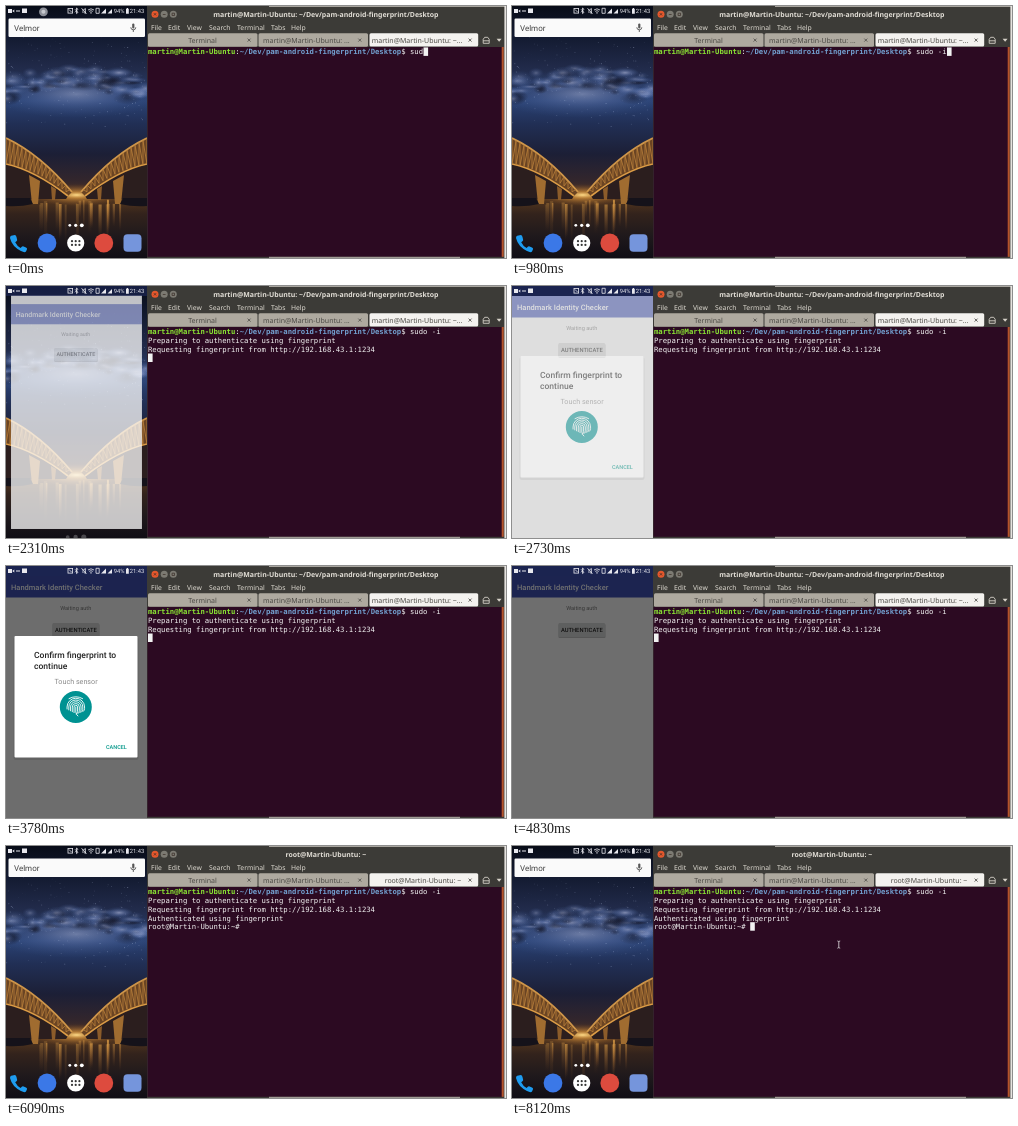
These frames come from a looping animation (500x252 px, 8.19 s). An HTML page:

```html
<!DOCTYPE html>
<html lang="en">
<head>
<meta charset="utf-8">
<title>Terminal fingerprint login</title>
<style>
  html, body { margin: 0; width: 100%; height: 100%; overflow: hidden; background: #2c0a22; }
  svg { display: block; width: 500px; height: 252px; }
  text { font-family: Roboto, sans-serif; text-rendering: geometricPrecision; white-space: pre; }
  .ui { font: 7px "Noto Sans", sans-serif; }
  .bold { font: bold 6.95px "Noto Sans", sans-serif; }
  .menu { font-size: 6.8px; }
  .mono { font: 7.264px "DejaVu Sans Mono", monospace; }
  .mid { text-anchor: middle; }
</style>
</head>
<body>
<svg viewBox="0 0 500 252">
  <defs>
    <clipPath id="phoneClip"><rect width="141" height="252"/></clipPath>
    <linearGradient id="sky" x2="0" y2="1">
      <stop offset="0" stop-color="#080c18"/>
      <stop offset=".16" stop-color="#131a30"/>
      <stop offset=".34" stop-color="#222c4c"/>
      <stop offset=".5" stop-color="#2a4274"/>
      <stop offset=".62" stop-color="#212f55"/>
      <stop offset=".78" stop-color="#1c1f36"/>
      <stop offset=".92" stop-color="#33262c"/>
      <stop offset="1" stop-color="#553620"/>
    </linearGradient>
    <linearGradient id="water" x2="0" y2="1">
      <stop offset="0" stop-color="#5c3b1f"/>
      <stop offset=".3" stop-color="#33231c"/>
      <stop offset=".65" stop-color="#1f191c"/>
      <stop offset="1" stop-color="#100e15"/>
    </linearGradient>
    <radialGradient id="haze">
      <stop offset="0" stop-color="#aab4d8" stop-opacity=".7"/>
      <stop offset=".45" stop-color="#6d82b8" stop-opacity=".4"/>
      <stop offset="1" stop-color="#41609c" stop-opacity="0"/>
    </radialGradient>
    <radialGradient id="dust">
      <stop offset="0" stop-color="#141626" stop-opacity=".8"/>
      <stop offset="1" stop-color="#141626" stop-opacity="0"/>
    </radialGradient>
    <radialGradient id="glow">
      <stop offset="0" stop-color="#ffdb88"/>
      <stop offset=".3" stop-color="#d8943c" stop-opacity=".7"/>
      <stop offset="1" stop-color="#8a5424" stop-opacity="0"/>
    </radialGradient>
    <linearGradient id="streak" x2="0" y2="1">
      <stop offset="0" stop-color="#f0ac4c" stop-opacity=".8"/>
      <stop offset="1" stop-color="#a8642a" stop-opacity="0"/>
    </linearGradient>
  </defs>

  <g clip-path="url(#phoneClip)">
    <rect width="141" height="190" fill="url(#sky)"/>
    <ellipse cx="70" cy="88" rx="90" ry="24" fill="url(#haze)" opacity=".75"/>
    <g id="clouds"></g>
    <g id="stars" fill="#c4d2f2"></g>
    <rect y="189" width="141" height="63" fill="url(#water)"/>
    <ellipse cx="70.5" cy="189" rx="46" ry="11" fill="url(#glow)"/>
    <g id="streaks" fill="url(#streak)"></g>
    <g id="bridge" fill="none">
      <path d="M0 158Q28 164 62 190L60 193H0Z" fill="#2b1e1e"/>
      <path d="M0 132Q34 148 66 186L62 190Q30 164 0 158Z" fill="#6a4423"/>
      <path d="M0 132Q34 148 66 186" stroke="#cf964a" stroke-width="1.8"/>
      <path d="M0 158Q28 164 62 190" stroke="#dc9c46" stroke-width="1.6"/>
      <g id="struts" stroke="#bb823c" stroke-width=".8"></g>
      <path d="M23 169L26 198H32L34 175Z" fill="#a06c30"/>
      <path d="M45 180L46 194H49L50 183Z" fill="#8c5c2a"/>
      <path d="M0 192H24L27 198Q14 201 0 200Z" fill="#15121a"/>
    </g>
    <use href="#bridge" transform="matrix(-1 0 0 1 141 0)"/>

    <g id="launcher">
      <rect x="2.5" y="12.5" width="136.5" height="18.5" rx="1.2" fill="#fafafa"/>
      <text x="8" y="24.8" font-size="8" fill="#424242">Velmor</text>
      <g fill="none" stroke="#555" stroke-width=".9">
        <rect x="126.2" y="17.5" width="2.2" height="5" rx="1.1" fill="#555" stroke="none"/>
        <path d="M124.8 21.3a2.5 2.5 0 0 0 5 0M127.3 23.8V26"/>
      </g>
      <g fill="#fff">
        <circle cx="63.8" cy="219.3" r="1.4"/><circle cx="69.7" cy="219.3" r="1.6"/><circle cx="75.8" cy="219.3" r="1.9"/>
        <circle cx="69.7" cy="237" r="8.6"/>
      </g>
      <path d="M5.2 229.8L8.8 229Q10 229 10.5 231L11.2 234Q11.3 235 9.2 236.2Q11 240 14.6 242Q16 240 17 240.2L20 241.4Q21.4 242 21 243.3L20 245.5Q18.8 247 15 245Q6 240.5 4 232Q4 230.4 5.2 229.8Z" fill="#1e9cf0"/>
      <circle cx="41" cy="237" r="9.4" fill="#3b78e7"/>
      <g id="grid" fill="#333"></g>
      <circle cx="97.8" cy="237" r="9.4" fill="#dd4b3e"/>
      <rect x="117.5" y="228.3" width="18" height="17.5" rx="4" fill="#7595dc"/>
    </g>

    <g id="app">
      <rect width="141" height="252" fill="#fafafa"/>
      <rect y="10" width="141" height="21.5" fill="#3f51b5"/>
      <text x="5" y="23.7" font-size="7.5" font-weight="500" fill="#fff">Handmark Identity Checker</text>
      <text class="mid" x="69.7" y="43.8" font-size="5.6" fill="#757575">Waiting auth</text>
      <rect x="46.5" y="58" width="47" height="14" rx="1" fill="#000" opacity=".22"/>
      <rect x="46.5" y="57" width="46.5" height="14" rx="1" fill="#d6d7d7"/>
      <text class="mid" x="69.8" y="66.2" font-size="5.8" font-weight="500" fill="#212121">AUTHENTICATE</text>
      <rect id="veil" y="10" width="141" height="242" fill="#fff"/>
      <rect id="dim" y="10" width="141" height="242"/>
    </g>
    <g id="dialog">
      <rect x="7.5" y="71" width="125" height="123" rx="2" opacity=".1"/>
      <rect x="8.5" y="70" width="123" height="121.5" rx="1" fill="#fff"/>
      <g font-size="8.55" font-weight="500" fill="#222">
        <text x="28" y="91.7">Confirm fingerprint to</text>
        <text x="28" y="102.9">continue</text>
      </g>
      <text class="mid" x="70" y="117.5" font-size="7.2" fill="#8a8a8a">Touch sensor</text>
      <circle cx="69.8" cy="141" r="16" fill="#009292"/>
      <g id="ridges" fill="none" stroke="#fff" stroke-width=".9" stroke-linecap="round"></g>
      <text x="100" y="182.8" font-size="5.5" font-weight="500" fill="#009688">CANCEL</text>
    </g>

    <rect id="bar" width="141" height="10" fill="#1b2450"/>
    <g fill="#e8e8ee">
      <path d="M2 3h4v4H2zM6.3 5l2-1.6v3.2zM10 4.6h4v1h-4zM16 2.5h5v4.6h-5z"/>
      <g fill="none" stroke="#e8e8ee" stroke-width=".8">
        <rect x="62" y="2.5" width="4.6" height="4.6"/>
        <path d="M63 3.5l2.6 2.6M69 3.3l3 3-1.5 1.3V2l1.5 1.3-3 3M76 4h1.4l2-1.5v5l-2-1.5H76M75.5 2.2l5 5.4"/>
        <path d="M82 4Q85 1.6 88 4M83.2 5.4Q85 4 86.8 5.4M90 2.3h3.2v5H90z"/>
      </g>
      <path d="M95 7.5L100 2.5V7.5ZM101.5 7.5L106 3V7.5ZM84.4 6.3h1.2v1.2h-1.2zM120 2.8h.8V2h1.2v.8h.8v5H120z"/>
      <text x="107.8" y="7.3" font-size="5.8">94%</text>
      <text x="123.8" y="7.3" font-size="5.8">21:43</text>
    </g>
    <g id="touch">
      <circle cx="37.4" cy="5.8" r="4.4" fill="#8d9099"/>
      <circle cx="37.4" cy="5.8" r="2" fill="#c6c8ce"/>
    </g>
  </g>

  <rect x="141" width="359" height="252" fill="#3c3b37"/>
  <rect x="263" width="237" height=".9" fill="#b5b2aa"/>
  <circle cx="149" cy="8.3" r="3.5" fill="#e5572c"/>
  <circle cx="158.2" cy="8.3" r="3.5" fill="#7c7a72"/>
  <circle cx="167.3" cy="8.3" r="3.5" fill="#7c7a72"/>
  <path d="M147.8 7.1l2.4 2.4m0-2.4l-2.4 2.4M156.8 8.5h2.8M166.1 7.2h2.4v2.3h-2.4z" fill="none" stroke="#3a2d28" stroke-width=".7"/>
  <text id="title" class="bold mid" x="319.8" y="11" fill="#e3dfd7"></text>
  <g id="menu" fill="#dfdbd2"></g>
  <rect x="142" y="27.3" width="109.5" height="13.5" rx="1.5" fill="#aea99f"/>
  <rect x="252.5" y="27.3" width="109.5" height="13.5" rx="1.5" fill="#aea99f"/>
  <rect x="363.5" y="27.3" width="108.7" height="13.2" rx="1.5" fill="#f4f2ef"/>
  <g fill="#4c4a45">
    <text class="ui mid" x="196.5" y="36.8">Terminal</text>
    <text class="ui" x="257" y="36.8">martin@Martin-Ubuntu: ...</text>
    <text id="tab" class="ui mid" y="36.8"></text>
  </g>
  <path d="M241.6 32.6l3 3m0-3l-3 3M352.3 32.6l3 3m0-3l-3 3M462.6 32.6l3 3m0-3l-3 3" stroke="#55534e" stroke-width=".9"/>
  <path d="M477.2 37.3v-4l1.5-2h3l1.5 2v4zM477.2 34.8h6" fill="none" stroke="#d5d1c8" stroke-width=".9"/>
  <path d="M490.6 32.8h5l-2.5 3z" fill="#d5d1c8"/>
  <rect x="141.5" y="41" width="354.5" height="209.8" fill="#2c0a22"/>
  <rect x="495.7" y="41" width="2" height="209.8" fill="#b4532b"/>
  <rect x="498.4" width="1.6" height="252" fill="#e6e3df"/>
  <rect x="263" y="250.8" width="191" height="1.2" fill="#a09c95"/>
  <g fill="#f2f2f2">
    <text class="mono" x="142" y="48.4"><tspan font-weight="bold" fill="#8ae234">martin@Martin-Ubuntu</tspan>:<tspan font-weight="bold" fill="#729fcf">~/Dev/pam-android-fingerprint/Desktop</tspan>$ <tspan id="typed"></tspan></text>
    <g id="rows"></g>
    <rect id="caret" width="4.6" height="8.5"/>
  </g>
  <path id="pointer" d="M325.4 95q1.2 0 1.4.8q.2-.8 1.4-.8M326.8 95.8v5.6M325.4 102.2q1.2 0 1.4-.8q.2.8 1.4.8" fill="none" stroke="#e8e4e6" stroke-width=".8"/>
</svg>
<script>
const LOOP = 8190, CELL = 4.373, ROW = 8.7, LEFT = 142, PROMPT = 60;
const NS = "http://www.w3.org/2000/svg";
const $ = id => document.getElementById(id);
const add = (parent, tag, attrs, text = "") => {
  const el = document.createElementNS(NS, tag);
  for (const k in attrs) el.setAttribute(k, attrs[k]);
  el.textContent = text;
  return $(parent).appendChild(el);
};
const set = (id, k, v) => $(id).setAttribute(k, v);
const put = (id, s) => { if ($(id).textContent !== s) $(id).textContent = s; };
const ramp = (t, a, b) => Math.min(1, Math.max(0, (t - a) / (b - a)));

// Night sky: bright and dark clouds along a shallow arch, then stars
let seed = 7;
const rnd = () => (seed = seed * 16807 % 2147483647) / 2147483647;
const arch = x => 66 + (x - 70) ** 2 / 330;
for (let i = 0; i < 90; i++) {
  const x = rnd() * 141, dark = i % 3 === 2;
  add("clouds", "ellipse", {
    cx: x, cy: arch(x) + (dark ? 9 : 3) + (rnd() - .5) * 20,
    rx: 5 + rnd() * 10, ry: 2 + rnd() * 5,
    fill: dark ? "url(#dust)" : "url(#haze)", opacity: .35 + rnd() * .4
  });
}
for (let i = 0; i < 220; i++) {
  const x = rnd() * 141, y = 20 + (rnd() + rnd()) * 55;
  add("stars", "circle", { cx: x, cy: y, r: .2 + rnd() * .3, opacity: .15 + rnd() * .5 });
}

// Bridge lattice and its reflections
for (let i = 0; i < 16; i++) {
  const u = i / 16, x = 64 * u, y = 132 + 32 * u + 21 * u * u, h = 26 - 22 * u;
  add("struts", "path", { d: `M${x} ${y}v${h}l4 ${3 - h}` });
}
for (let i = 0; i < 22; i++) {
  const x = 24 + rnd() * 93, w = 1 + rnd() * 2.5;
  add("streaks", "rect", { x, y: 193 + rnd() * 6, width: w, height: 16 + rnd() * 28, opacity: .2 + rnd() * .5 });
}

for (let i = 0; i < 6; i++)
  add("grid", "circle", { cx: 66 + i % 3 * 3.7, cy: 235.2 + (i > 2 ? 3.7 : 0), r: 1.1 });
for (let i = 1; i < 6; i++) {
  const r = i * 1.75, drop = 6.5 - i * .9;
  add("ridges", "path", { d: `M${69.8 - r} ${141 + drop}V141A${r} ${r} 0 0 1 ${69.8 + r} 141v${drop * .8}q0 1.5 -1 2.6` });
}
add("ridges", "path", { d: "M69.8 141v5q.3 2.5 2 4M63 132.6Q69.8 128.8 76.6 132.6" });
[["File", 145], ["Edit", 162], ["View", 181], ["Search", 203], ["Terminal", 231], ["Tabs", 265], ["Help", 285]]
  .forEach(([s, x]) => add("menu", "text", { class: "ui menu", x, y: 24.3 }, s));

const lines = [
  [1330, "Preparing to authenticate using fingerprint"],
  [1330, "Requesting fingerprint from http://192.168.43.1:1234"],
  [5390, "Authenticated using fingerprint"],
  [5390, "root@Martin-Ubuntu:~# "]
].map(([at, s], i) => ({
  at, len: s.length,
  el: add("rows", "text", { class: "mono", x: LEFT, y: 48.4 + ROW * (i + 1) }, s)
}));
const keys = [140, 280, 420, 560];

function terminal(t) {
  const count = 3 + keys.filter(k => t >= k).length;
  put("typed", "sudo -i".slice(0, count));
  let shown = 0;
  for (const l of lines) {
    const on = t >= l.at;
    l.el.setAttribute("visibility", on ? "visible" : "hidden");
    shown += on;
  }
  const root = shown === 4;
  const col = root ? lines[3].len : shown ? 0 : PROMPT + count;
  const row = root ? 4 : shown ? 3 : 0;
  set("caret", "x", LEFT + col * CELL);
  set("caret", "y", 41.4 + row * ROW);
  set("caret", "opacity", t < 2030 || Math.floor((t - 2030) / 700) % 2 === 0 ? 1 : 0);
  put("title", root ? "root@Martin-Ubuntu: ~" : "martin@Martin-Ubuntu: ~/Dev/pam-android-fingerprint/Desktop");
  put("tab", root ? "root@Martin-Ubuntu: ~" : "martin@Martin-Ubuntu: ~...");
  set("tab", "x", root ? 417 : 411);
  set("pointer", "opacity", t >= 7490 ? 1 : 0);
}

const scale = (id, x, y = x) =>
  set(id, "transform", `translate(70 126) scale(${x} ${y}) translate(-70 -126)`);

function phone(t) {
  const zoom = ramp(t, 1940, 2390), open = ramp(t, 2060, 2390);
  const close = ramp(t, 5040, 5460), left = 1 - close;
  const opening = t < 4000, seen = opening ? open : .8 * left ** 3;
  scale("launcher", 1 + (opening ? .5 * zoom * zoom : .44 * left * left));
  set("launcher", "opacity", opening ? 1 - open : Math.min(1, close * 1.6));
  if (opening) scale("app", .7 + .3 * open);
  else scale("app", 1 - .7 * close, Math.max(.01, left));
  // The window stays solid until it starts to close
  const solid = !opening && close === 0 ? 1 : seen;
  set("app", "opacity", solid);
  set("bar", "opacity", solid);
  set("veil", "opacity", .5 * (1 - ramp(t, 2730, 3000)));
  set("dim", "opacity", .56 * ramp(t, 2660, 2987) * (1 - ramp(t, 4830, 5040)));
  set("dialog", "opacity", t < 4830 ? ramp(t, 2660, 2800) : 0);
  set("touch", "opacity", 1 - ramp(t, 70, 280));
}

function draw(now) {
  const t = now % LOOP;
  terminal(t);
  phone(t);
}
const start = performance.now();
function tick() {
  draw(performance.now() - start);
  requestAnimationFrame(tick);
}
tick();
</script>
</body>
</html>
```
